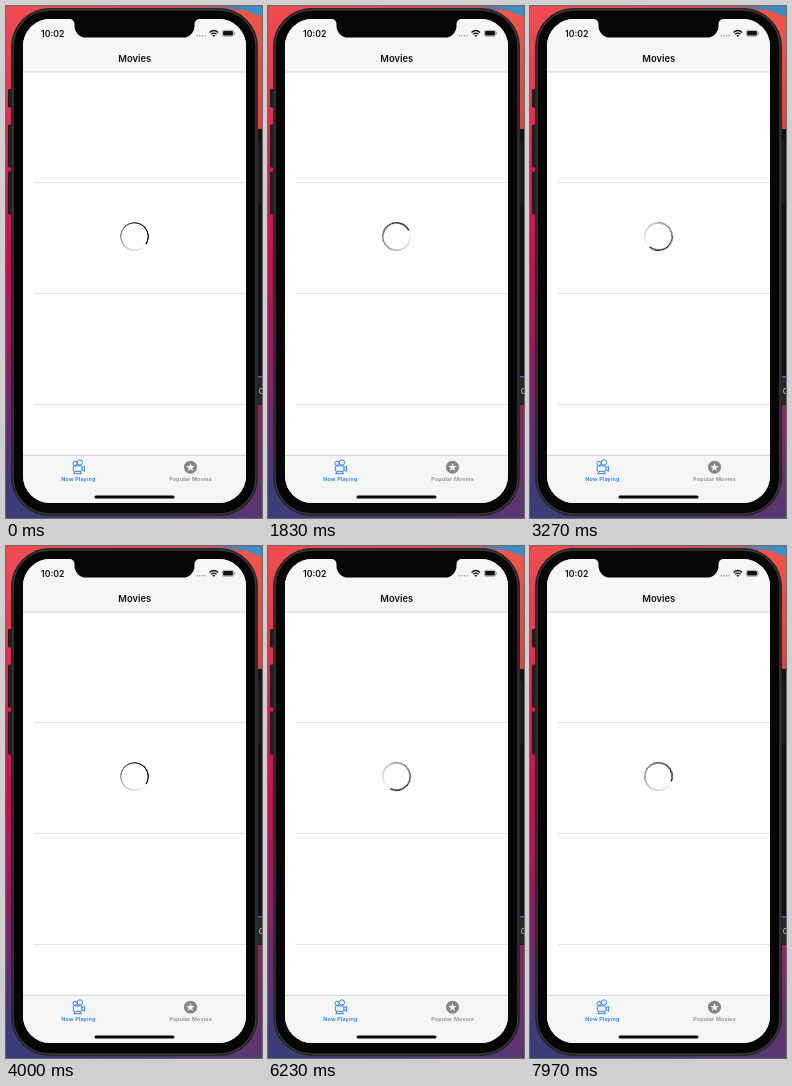
These frames come from a looping animation (256x512 px, 8000 ms). An HTML page:

```html
<!DOCTYPE html>
<html lang="en">
<head>
<meta charset="utf-8">
<title>Movies loading</title>
<style>
  html, body { margin: 0; width: 100%; height: 100%; overflow: hidden; }
  .stage { position: relative; width: 256px; height: 512px; overflow: hidden; background: #c01050; }
  svg { position: absolute; inset: 0; display: block; }
  text { font-family: Inter, "Liberation Sans", sans-serif; font-weight: 600; text-anchor: middle; }
  .tab { font-size: 5.4px; letter-spacing: .17px; }
  .spinner {
    --ring: radial-gradient(circle, transparent 12.8px, #000 13.3px, #000 14.2px, transparent 14.6px);
    position: absolute; left: 114px; top: 215.7px; width: 29px; height: 29px; border-radius: 50%;
    background: conic-gradient(from 125deg, rgba(0,0,0,0), rgba(0,0,0,.3) 30%, rgba(0,0,0,.72) 62%, #000 82%, #000);
    -webkit-mask: var(--ring);
    mask: var(--ring);
  }
</style>
</head>
<body>
<div class="stage">
  <svg width="256" height="512" viewBox="0 0 256 512">
    <defs>
      <linearGradient id="left" x2="0" y2="1">
        <stop offset="0" stop-color="#ee4d50"/>
        <stop offset=".15" stop-color="#e83c50"/>
        <stop offset=".32" stop-color="#d71c4f"/>
        <stop offset=".5" stop-color="#c01352"/>
        <stop offset=".66" stop-color="#9b1d5c"/>
        <stop offset=".82" stop-color="#642f70"/>
        <stop offset=".94" stop-color="#3f3b78"/>
        <stop offset="1" stop-color="#3a3f78"/>
      </linearGradient>
      <linearGradient id="right" x2="0" y2="1">
        <stop offset="0" stop-color="#f0564a"/>
        <stop offset=".2" stop-color="#e64540"/>
        <stop offset=".5" stop-color="#b82b5c"/>
        <stop offset=".8" stop-color="#86285d"/>
        <stop offset="1" stop-color="#573773"/>
      </linearGradient>
      <linearGradient id="top">
        <stop offset="0" stop-color="#ee4d50"/>
        <stop offset=".6" stop-color="#e04a50"/>
        <stop offset=".82" stop-color="#b4586c"/>
        <stop offset=".92" stop-color="#4588b8"/>
        <stop offset="1" stop-color="#3a8fc9"/>
      </linearGradient>
      <linearGradient id="bottom">
        <stop offset="0" stop-color="#3a3f78"/>
        <stop offset="1" stop-color="#573773"/>
      </linearGradient>
      <clipPath id="screen"><rect x="17" y="13" width="223" height="484" rx="27"/></clipPath>
    </defs>

    <!-- desktop -->
    <rect width="128" height="512" fill="url(#left)"/>
    <rect x="128" width="128" height="512" fill="url(#right)"/>
    <path d="M0 0H256V11L238 4H0Z" fill="url(#top)"/>
    <rect y="506" width="256" height="6" fill="url(#bottom)"/>
    <rect x="250" y="123" width="6" height="276" fill="#111216"/>
    <rect x="250" y="370" width="6" height="29" fill="#25262d"/>
    <rect x="252" y="370" width="4" height="1.5" fill="#4d65b5"/>
    <text x="255.3" y="387.6" font-size="7" fill="#b5b6bd">C</text>

    <!-- phone body -->
    <g fill="#201b1e">
      <rect x="2" y="83" width="5" height="18.5" rx="1"/>
      <rect x="2" y="118.5" width="5" height="43" rx="1"/>
      <rect x="2" y="165.5" width="5" height="43" rx="1"/>
      <rect x="250" y="135" width="5" height="64" rx="1"/>
    </g>
    <rect x="5.5" y="2.5" width="246" height="507" rx="38" fill="#060606" stroke="#29292b"/>
    <rect x="7" y="4" width="243" height="504" rx="36.5" fill="none" stroke="#3b3b3d" stroke-width="1.5"/>

    <!-- screen -->
    <g clip-path="url(#screen)">
      <rect x="17" y="13" width="223" height="484" fill="#fdfdfd"/>
      <rect x="17" y="13" width="223" height="53" fill="#f6f6f6"/>
      <rect x="17" y="65.5" width="223" height="1" fill="#d6d6d6"/>
      <path d="M28 176.5H240M28 287.5H240M28 398.5H240" stroke="#e6e2e8"/>
      <rect x="17" y="449" width="223" height="48" fill="#f5f5f5"/>
      <rect x="17" y="448.8" width="223" height="1" fill="#d2d2d2"/>
    </g>
    <path d="M63.5 12V13A5 5 0 0 1 68.5 18V20A11.5 11.5 0 0 0 80 31.5H177A11.5 11.5 0 0 0 188.5 20V18A5 5 0 0 1 193.5 13V12Z" fill="#060606"/>

    <!-- status bar -->
    <text x="46.7" y="30.6" font-size="8.7" fill="#111">10:02</text>
    <g fill="#8b8b8b">
      <circle cx="191.2" cy="29.7" r=".75"/><circle cx="193.8" cy="29.7" r=".75"/>
      <circle cx="196.4" cy="29.7" r=".75"/><circle cx="199" cy="29.7" r=".75"/>
    </g>
    <path d="M203.5 26.4Q207.8 22.6 212.1 26.4M205.1 28.2Q207.8 25.9 210.5 28.2" fill="none" stroke="#111" stroke-width="1.3"/>
    <path d="M206.3 29.3Q207.8 28.2 209.3 29.3L207.8 31Z" fill="#111"/>
    <rect x="216.3" y="24.3" width="11.4" height="6" rx="1.7" fill="none" stroke="#777" stroke-width=".6"/>
    <rect x="217.1" y="25.1" width="9.8" height="4.4" rx="1" fill="#111"/>
    <rect x="228.3" y="26.2" width=".8" height="2.2" rx=".4" fill="#777"/>

    <text x="128.7" y="56.2" font-size="9.4" fill="#111">Movies</text>

    <!-- tabs -->
    <g fill="none" stroke="#2680ef" stroke-width=".95" stroke-linejoin="round">
      <circle cx="69" cy="457.4" r="2.1"/>
      <circle cx="73.9" cy="456.5" r="2.7"/>
      <rect x="67.3" y="459.9" width="8.6" height="5.4" rx="1"/>
      <path d="M75.9 462L78.6 460.3V465.3L75.9 463.6M69.3 465.5L67.6 467.7H75.6L73.9 465.5"/>
    </g>
    <text class="tab" x="72.4" y="475.4" fill="#1d7cf0">Now Playing</text>
    <circle cx="184.5" cy="461.2" r="6.5" fill="#858585"/>
    <polygon id="star" fill="#f5f5f5"/>
    <text class="tab" x="184.5" y="475.4" fill="#8c8c8c">Popular Movies</text>
    <rect x="88.5" y="489.5" width="80" height="3" rx="1.5" fill="#080808"/>
  </svg>
  <div class="spinner"></div>
</div>
<script>
  const starPoints = Array.from({ length: 10 }, (_, i) => {
    const radius = i % 2 ? 1.8 : 4.5;
    const angle = (i / 5 - 0.5) * Math.PI;
    return [184.5 + radius * Math.cos(angle), 461.4 + radius * Math.sin(angle)];
  });
  document.getElementById("star").setAttribute("points", starPoints.join(" "));

  // One clockwise turn per second at 30 steps; the small lead absorbs clock rounding.
  document.querySelector(".spinner").animate(
    [{ transform: "rotate(0deg)" }, { transform: "rotate(360deg)" }],
    { duration: 1000, iterations: Infinity, easing: "steps(30)", delay: -4 }
  );
</script>
</body>
</html>
```
